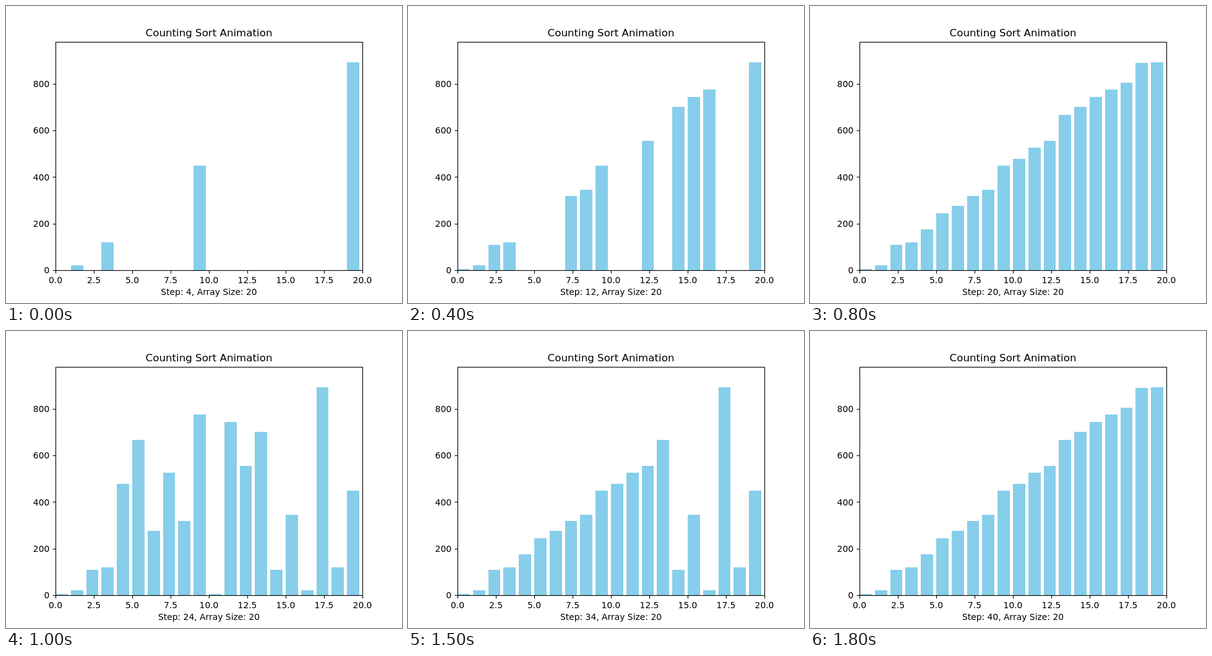
An HTML page with a canvas that plays this animation: 640 by 480 pixels, repeating every 8000 ms.

```html
<!DOCTYPE html>
<html lang="en">
<head>
<meta charset="utf-8">
<title>Counting Sort Animation</title>
<style>
  html, body { margin: 0; width: 100%; height: 100%; overflow: hidden; background: #fff; }
  canvas { display: block; }
</style>
</head>
<body>
<canvas id="stage" width="640" height="480"></canvas>
<script>
const ctx = document.getElementById('stage').getContext('2d');
const LOOP = 8000, STEP_MS = 50, FIRST_STEP = 4;
const LEFT = 80, RIGHT = 576, TOP = 58, BASE = 427.2, UNIT = 24.8;

const values = [804, 175, 889, 244, 478, 666, 276, 526, 319, 775,
                6, 743, 556, 701, 109, 346, 22, 891, 119, 449];
const size = values.length;
const sorted = [...values].sort((a, b) => a - b);
const scale = 369.6 / (sorted[size - 1] * 1.1);
const yOf = v => BASE - v * scale;

// First pass places values from the back; second pass copies the result over the input.
function arrayAt(step) {
  if (step > size) {
    const copied = step - size;
    return [...sorted.slice(0, copied), ...values.slice(copied)];
  }
  const placed = new Set(values.slice(size - step));
  return sorted.map(v => placed.has(v) ? v : 0);
}

function text(str, x, y, align = 'center', px = 13.889) {
  ctx.font = `${px}px "DejaVu Sans", sans-serif`;
  ctx.textAlign = align;
  ctx.fillText(str, x, y);
}

function line(x1, y1, x2, y2) {
  ctx.beginPath();
  ctx.moveTo(x1, y1);
  ctx.lineTo(x2, y2);
  ctx.stroke();
}

function draw(step) {
  ctx.fillStyle = '#fff';
  ctx.fillRect(0, 0, 640, 480);

  ctx.fillStyle = 'skyblue';
  const floor = Math.round(BASE);
  arrayAt(step).forEach((v, i) => {
    const x = LEFT + i * UNIT;
    const x1 = Math.round(x), x2 = Math.round(x + 0.8 * UNIT);
    const y = Math.round(yOf(v));
    ctx.fillRect(x1, y, x2 - x1, floor - y);
  });

  ctx.fillStyle = ctx.strokeStyle = '#000';
  ctx.lineWidth = 1.11;
  ctx.strokeRect(LEFT + 0.5, TOP + 0.5, RIGHT - LEFT, floor - TOP);
  for (let v = 0; v <= 20; v += 2.5) {
    const x = LEFT + v * UNIT;
    line(x + 0.5, floor + 0.5, x + 0.5, floor + 5.36);
    text(v.toFixed(1), x, 448);
  }
  for (let v = 0; v <= 800; v += 200) {
    const y = Math.round(yOf(v)) + 0.5;
    line(LEFT + 0.5, y, LEFT - 4.36, y);
    text(v, 70.3, Math.round(yOf(v) + 5.27), 'right');
  }
  text('Counting Sort Animation', 328, 49, 'center', 16.667);
  text(`Step: ${step}, Array Size: ${size}`, 328, 467);
}

const start = performance.now();
function frame() {
  const t = (performance.now() - start) % LOOP;
  draw(Math.min(2 * size, FIRST_STEP + Math.floor(t / STEP_MS)));
  requestAnimationFrame(frame);
}
frame();
</script>
</body>
</html>
```
